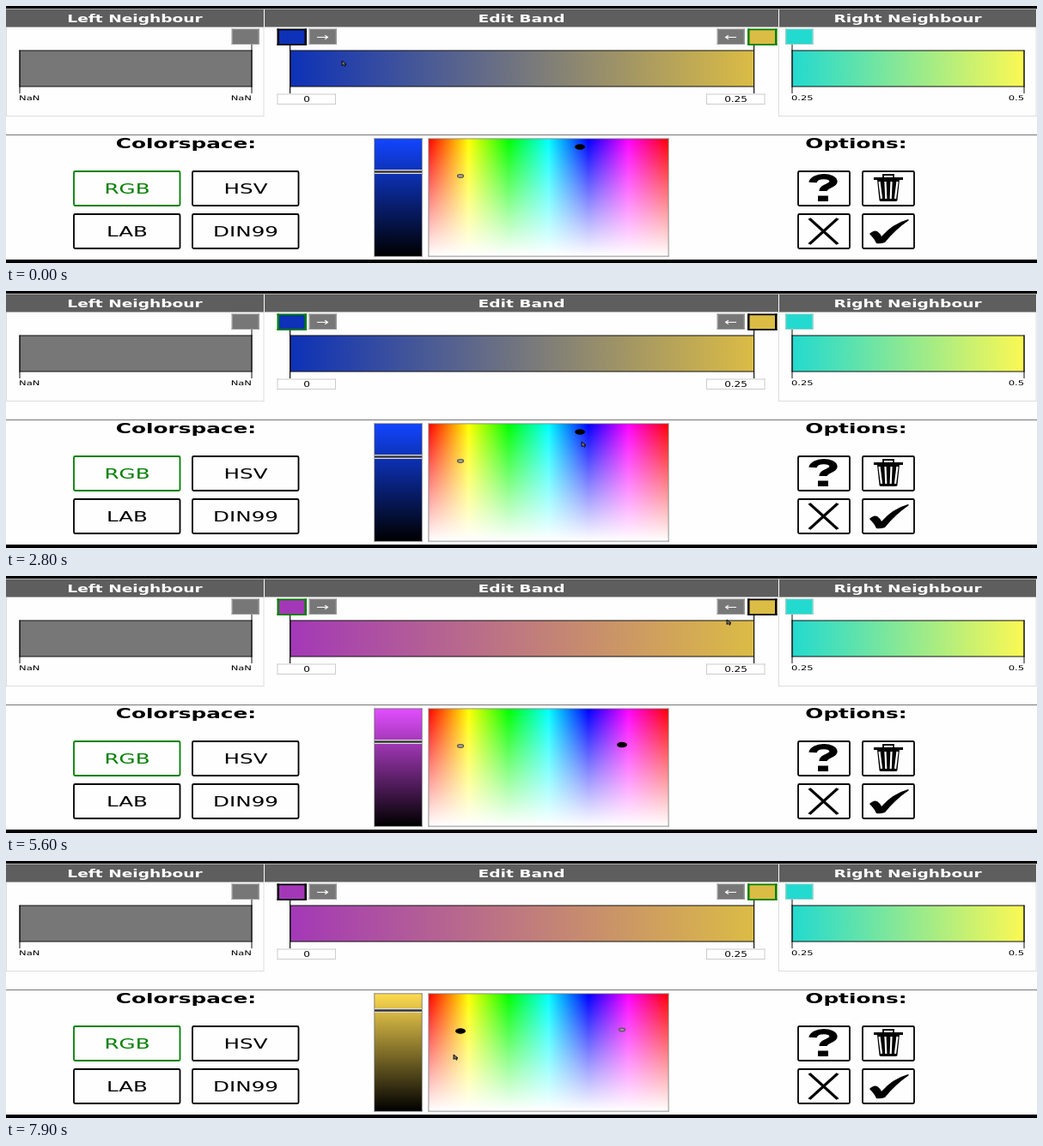
These frames come from a looping animation (1200 px wide and 300 px high, 8000 ms). An HTML page with a canvas:

```html
<!DOCTYPE html>
<html lang="en">
<head>
<meta charset="utf-8">
<style>
html, body { margin: 0; width: 100%; height: 100%; overflow: hidden; background: #fefefe; }
canvas { display: block; width: 1200px; height: 300px; }
</style>
</head>
<body>
<canvas id="stage" width="1200" height="300"></canvas>
<script>
const ctx = document.getElementById('stage').getContext('2d');
const LOOP = 8000, STEP = 100;
const ASPECT = 1.5; // the whole interface is shown wider than tall
const PICKER = { x: 492, y: 155, w: 279, h: 137 };
const SLIDER = { x: 429, y: 155, w: 55, h: 137 };
const GREY = '#777', GREEN = '#008000';

// Time, x, y of the pointer
const pointerPath = [
  [0, 393, 67], [900, 334, 40], [1500, 332, 43], [1600, 331, 47],
  [2400, 664, 171], [2800, 672, 179], [3400, 628, 212], [3700, 629, 213],
  [4300, 698, 231], [4600, 717, 197], [5000, 718, 196], [5600, 841, 54],
  [6200, 884, 38], [6500, 885, 37], [6900, 884, 38], [7600, 535, 217], [7900, 523, 229]
];
const leftPicks = [
  { from: 0, x: 668, y: 164.5 },
  { from: 3400, x: 628.5, y: 212 },
  { from: 4700, x: 717, y: 197 }
];
const rightPick = { x: 529, y: 198.5, thumb: 174.5 };
const LEFT_THUMB = 193.5, PICK_LEFT = 1200, PICK_RIGHT = 6800;

function pointerAt(t) {
  const i = pointerPath.findIndex(k => k[0] > t);
  if (i < 0) return pointerPath[pointerPath.length - 1].slice(1);
  const [t0, x0, y0] = pointerPath[i - 1], [t1, x1, y1] = pointerPath[i];
  let p = (t - t0) / (t1 - t0);
  p = p * p * (3 - 2 * p);
  return [x0 + (x1 - x0) * p, y0 + (y1 - y0) * p];
}

function hsv(h, s, v) {
  const channel = n => {
    const k = (n + h / 60) % 6;
    return Math.round(255 * v * (1 - s * Math.max(0, Math.min(k, 4 - k, 1))));
  };
  return `rgb(${channel(5)},${channel(3)},${channel(1)})`;
}

function pickColor(pick, v) {
  return hsv((pick.x - PICKER.x) / PICKER.w * 360, 1 - (pick.y - PICKER.y) / PICKER.h, v);
}

const valueOf = thumb => 1 - (thumb - SLIDER.y) / SLIDER.h;

function rect(x, y, w, h, color) {
  ctx.fillStyle = color;
  ctx.fillRect(x, y, w, h);
}

function frame(x, y, w, h, color, sideWidth = 1, edgeWidth = 1) {
  rect(x, y, w, edgeWidth, color);
  rect(x, y + h - edgeWidth, w, edgeWidth, color);
  rect(x, y, sideWidth, h, color);
  rect(x + w - sideWidth, y, sideWidth, h, color);
}

function gradient(x0, y0, x1, y1, ...colors) {
  const g = ctx.createLinearGradient(x0, y0, x1, y1);
  colors.forEach((c, i) => g.addColorStop(i / (colors.length - 1), c));
  return g;
}

function text(str, x, y, size, { align = 'center', color = '#000', weight = 'normal' } = {}) {
  ctx.save();
  ctx.translate(x, y);
  ctx.scale(ASPECT, 1);
  ctx.font = `${weight} ${size}px "DejaVu Sans", sans-serif`;
  ctx.textAlign = align;
  ctx.fillStyle = color;
  ctx.fillText(str, 0, 0);
  ctx.restore();
}

function shape(d, x, y, { fill, stroke, width = 1, scaleX = 1 } = {}) {
  ctx.save();
  ctx.translate(x, y);
  ctx.scale(scaleX, 1);
  const path = new Path2D(d);
  if (fill) { ctx.fillStyle = fill; ctx.fill(path); }
  if (stroke) { ctx.strokeStyle = stroke; ctx.lineWidth = width; ctx.stroke(path); }
  ctx.restore();
}

function panel(x, w, title) {
  rect(x, 4, w, 20.5, '#5e5e5e');
  text(title, x + w / 2, 18.5, 12.4, { color: '#fff', weight: 'bold' });
}

function band(x, w, from, to) {
  rect(x, 52, w, 42, gradient(x, 0, x + w, 0, from, to));
  frame(x - 0.5, 51.5, w + 1, 43, '#111');
}

function swatch(x, color, border, active) {
  rect(x, 27, active ? 34 : 32, active ? 19 : 18, color);
  if (active) frame(x - 0.5, 26.5, 34.5, 19.5, border, 2.5, 1.8);
  else frame(x - 0.5, 26.5, 32.5, 18.5, border, 1.5, 1);
}

function button(x, y, w, color = '#000') {
  ctx.strokeStyle = color;
  ctx.lineWidth = 1.8;
  ctx.beginPath();
  ctx.roundRect(x, y, w, 40, 1.5);
  ctx.stroke();
}

function labelButton(x, y, label, color) {
  button(x, y, 123.5, color);
  text(label, x + 62, y + 25.5, 16.4, { color });
}

function drawNeighbours() {
  frame(0, 24, 300.5, 105, '#ddd');
  frame(899, 24, 300.5, 105, '#ddd');
  panel(0, 300, 'Left Neighbour');
  panel(301, 598, 'Edit Band');
  panel(900, 299, 'Right Neighbour');

  band(16, 270, GREY, GREY);
  band(915, 270, '#22dacf', '#fcf853');
  rect(15.5, 52, 1, 50, '#111');
  rect(285.5, 45, 1, 57, '#111');
  rect(914.5, 45, 1, 57, '#111');
  rect(1184.5, 52, 1, 50, '#111');
  swatch(263, GREY, '#999');
  swatch(907.5, '#22dacf', '#8ccfc9');
  text('NaN', 15, 109.5, 7.7, { align: 'left' });
  text('NaN', 286, 109.5, 7.7, { align: 'right' });
  text('0.25', 914, 109.5, 7.7, { align: 'left' });
  text('0.5', 1185, 109.5, 7.7, { align: 'right' });
}

function drawEditBand(leftColor, rightColor, rightActive) {
  band(331, 539.5, leftColor, rightColor);
  rect(330, 45, 1.2, 57, '#111');
  rect(870, 45, 1.2, 57, '#111');
  swatch(316, leftColor, rightActive ? '#000' : GREEN, true);
  swatch(863.5, rightColor, rightActive ? GREEN : '#000', true);
  swatch(353, GREY, '#999');
  swatch(828, GREY, '#999');
  text('→', 368.5, 39.5, 12, { color: '#fff' });
  text('←', 843.5, 39.5, 12, { color: '#fff' });
  for (const [x, value] of [[316, '0'], [815.5, '0.25']]) {
    rect(x, 103, 68, 12, '#fff');
    frame(x - 0.5, 102.5, 68.5, 12.5, '#ccc');
    text(value, x + 34, 111.5, 8);
  }
}

function drawPicker(active, other, thumb) {
  const s = SLIDER, p = PICKER;
  rect(s.x, s.y, s.w, s.h, gradient(0, s.y, 0, s.y + s.h, pickColor(active, 1), '#000'));
  frame(s.x - 0.5, s.y - 0.5, s.w + 1, s.h + 1, '#555', 0.7, 0.7);
  rect(s.x, thumb - 2.5, s.w, 5, '#ddd');
  rect(s.x, thumb - 1.2, s.w, 2.4, '#333');

  const hues = [0, 60, 120, 180, 240, 300, 0].map(h => hsv(h, 1, 1));
  rect(p.x, p.y, p.w, p.h, gradient(p.x, 0, p.x + p.w, 0, ...hues));
  rect(p.x, p.y, p.w, p.h, gradient(0, p.y, 0, p.y + p.h, 'rgba(255,255,255,0)', '#fff'));
  frame(p.x - 0.5, p.y - 0.5, p.w + 1, p.h + 1, '#777', 0.8, 0.8);

  ctx.beginPath();
  ctx.ellipse(other.x, other.y, 3.5, 1.8, 0, 0, Math.PI * 2);
  ctx.fillStyle = 'rgba(150,150,150,.7)';
  ctx.fill();
  ctx.strokeStyle = '#555';
  ctx.lineWidth = 1.2;
  ctx.stroke();
  ctx.beginPath();
  ctx.ellipse(active.x, active.y, 6, 3.2, 0, 0, Math.PI * 2);
  ctx.fillStyle = '#000';
  ctx.fill();
}

function drawOptions() {
  for (const x of [922, 997]) for (const y of [193, 243]) button(x, y, 60, '#000');
  // Question mark
  shape('M-8 -5 C-7 -14 8 -14 8 -6 C8 -1 0 -1 0 5', 951, 211,
    { stroke: '#000', width: 6.2, scaleX: 1.5 });
  rect(945, 221.5, 12, 6.5, '#000');
  // Bin
  shape('M-7 -12 H7 L5.5 15 Q5.5 16 4 16 H-4 Q-5.5 16 -5.5 15 Z', 1027, 212,
    { fill: '#000', scaleX: 1.9 });
  rect(1010, 200, 34, 3, '#000');
  shape('M-6 0 V-3 H6 V0', 1027, 200, { stroke: '#000', width: 1.8 });
  shape('M-10.5 -7 L-8 13 M-3.5 -7 L-2.7 13 M3.5 -7 L2.7 13 M10.5 -7 L8 13', 1027, 212,
    { stroke: '#fff', width: 2.2 });
  // Cross
  shape('M-11 -15 L11 15 M11 -15 L-11 15', 951.5, 263, { stroke: '#000', width: 2.6, scaleX: 1.5 });
  // Tick
  shape('M-22 3 Q-17 -2 -13 0 Q-10 2 -8 6 Q5 -9 23 -14 L24 -13 Q8 -2 -4 13 Q-10 15 -14 14 Q-16 9 -22 3 Z',
    1027, 263, { fill: '#000' });
}

function drawPointer([x, y]) {
  const overSwatch = y > 26 && y < 49 && (Math.abs(x - 333) < 17 || Math.abs(x - 880) < 17);
  if (overSwatch) {
    shape('M-2 -3 H0 V-1 H4 V2 H-2 L-4 0 H-2 Z', x, y, { fill: '#000' });
  } else {
    shape('M-2 -3 V2.5 L-.4 1.5 L1.4 3.4 L2 2.4 L1 1 H3 Z', x, y,
      { fill: '#777', stroke: '#000', width: 0.9 });
  }
}

function draw(t) {
  const left = leftPicks.filter(k => k.from <= t).pop();
  const onRight = t >= PICK_RIGHT;
  const leftColor = pickColor(left, valueOf(LEFT_THUMB));
  const rightColor = pickColor(rightPick, valueOf(rightPick.thumb));

  rect(0, 0, 1200, 300, '#fefefe');
  rect(0, 0, 1200, 3.3, '#000');
  rect(0, 296, 1200, 4, '#000');
  rect(0, 150, 1200, 1, '#777');

  drawNeighbours();
  drawEditBand(leftColor, rightColor, onRight || t < PICK_LEFT);

  text('Colorspace:', 209.5, 166, 16.5, { weight: 'bold' });
  text('Options:', 989.5, 166, 16.5, { weight: 'bold' });
  labelButton(79, 193, 'RGB', GREEN);
  labelButton(217, 193, 'HSV', '#000');
  labelButton(79, 243, 'LAB', '#000');
  labelButton(217, 243, 'DIN99', '#000');

  if (onRight) drawPicker(rightPick, left, rightPick.thumb);
  else drawPicker(left, rightPick, LEFT_THUMB);
  drawOptions();
  drawPointer(pointerAt(t));
}

const start = performance.now();
function tick() {
  const t = (performance.now() - start) % LOOP;
  draw(Math.floor(t / STEP) * STEP);
  requestAnimationFrame(tick);
}
tick();
</script>
</body>
</html>
```
